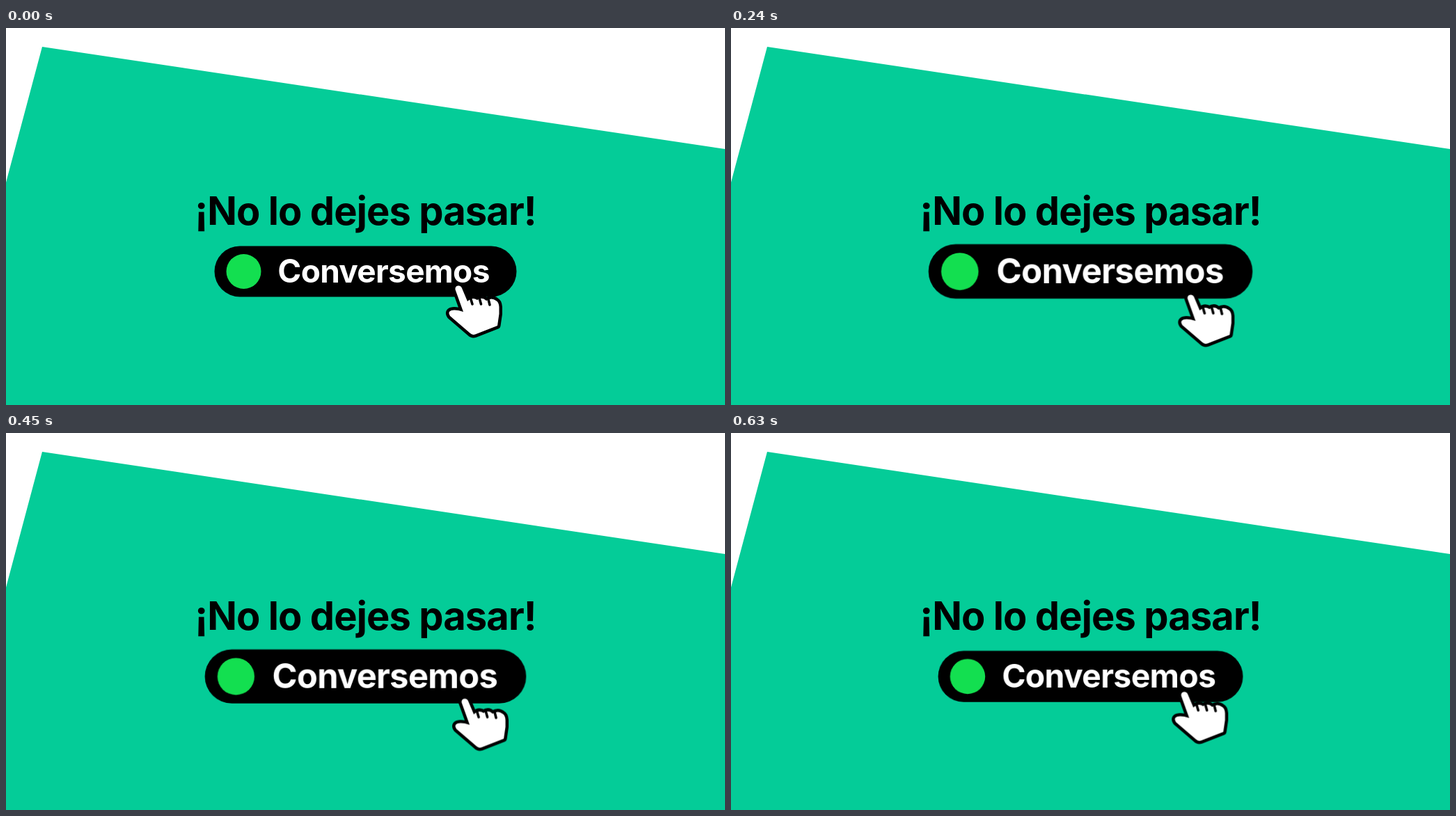
Write an HTML page that moves like this. It is 1033x542 px and loops after 660 ms.

```html
<!DOCTYPE html>
<html lang="es">
<head>
<meta charset="utf-8">
<title>Conversemos</title>
<style>
  html, body { margin: 0; width: 100%; height: 100%; overflow: hidden; background: #fff; }
  svg { display: block; width: 100vw; height: 100vh; }
  text { font-family: Inter, "Open Sans", sans-serif; font-weight: 700; text-anchor: middle; }
  .title { font-size: 56px; letter-spacing: -0.9px; }
  .label { font-size: 46px; letter-spacing: -0.7px; fill: #fff; }

  /* Two straight halves, stepped at 30 ms */
  .button, .hand { animation: 660ms steps(11, end) infinite; }
  .button { animation-name: grow; transform-origin: 516.5px 350px; }
  .hand { animation-name: retreat; }
  @keyframes grow { 50% { transform: scale(1.1); } }
  @keyframes retreat { 50% { transform: translate(14.3px, 18px); } }

  .skin { fill: #fff; stroke: #000; stroke-width: 9; stroke-linejoin: round; paint-order: stroke; }
  .gaps { fill: none; stroke: #000; stroke-width: 3.6; stroke-linecap: round; }
</style>
</head>
<body>
<svg viewBox="0 0 1033 542">
  <path fill="#04cc98" d="M52 27L1033 174V542H0V222Z"/>
  <text class="title" x="516.5" y="283">¡No lo dejes pasar!</text>
  <g class="button">
    <rect x="299.5" y="313.5" width="434" height="73" rx="36.5"/>
    <circle cx="341.5" cy="350" r="25" fill="#13df50"/>
    <text class="label" x="542.5" y="366">Conversemos</text>
  </g>
  <g class="hand">
    <path class="skin" d="M645.5 376Q645 371 649.5 370.5Q653.5 370 655 374L663 393
      Q670 386 677 391Q684 386 690 392Q698 387 704 392Q708 394 708.5 401V411
      L706 428L674 440.5Q670 442 666.5 438.5L638 414Q634 408 640 406Q646 404.500 657 408Z"/>
    <path class="gaps" d="M667 387l3 10M680 388l2.500 9M693 390l2 8"/>
  </g>
</svg>
</body>
</html>
```
